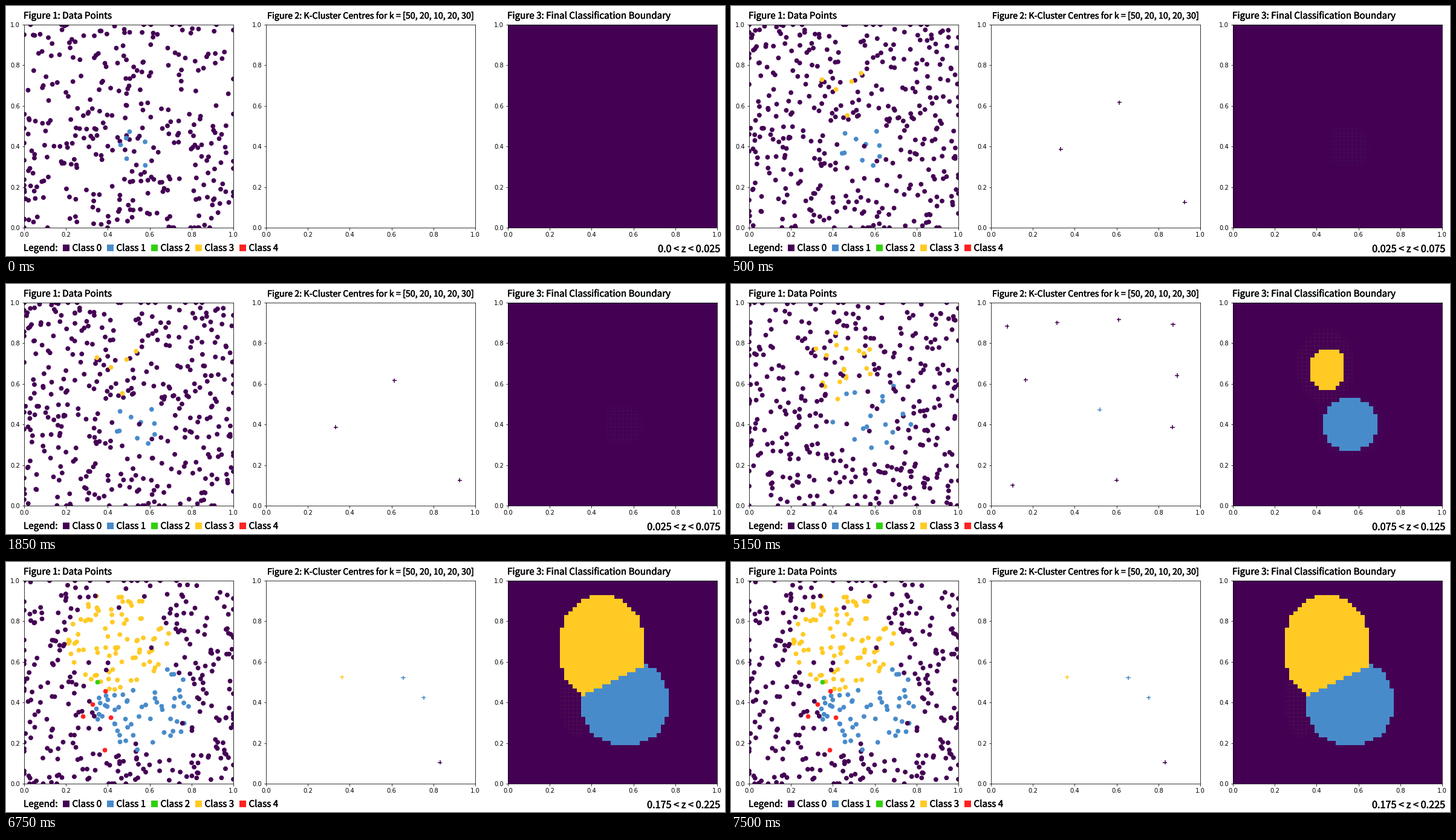
Recreate the animation shown at these times as a matplotlib script. Size 1189x415 px, loop 8000 ms.

```python
import numpy as np
import matplotlib.pyplot as plt
from matplotlib import patheffects
from matplotlib.animation import FuncAnimation
from matplotlib.collections import LineCollection
from matplotlib.colors import to_rgb, to_rgba
from matplotlib.patches import Rectangle

W, H = 1189, 415
LEFTS = (30, 430, 830)
BOTTOM, AX_W, AX_H = 368, 346, 337
STEP, LOOP = 250, 8000
CELLS = 51  # grid nodes per side, one square around each
ROUNDNESS = 2.2  # superellipse power of the class regions

PURPLE, BLUE, GREEN, YELLOW, RED = COLORS = (
    "#440154", "#488bcb", "#31d00e", "#ffca24", "#ff2222")

# Ellipses are (x, y, rx, ry) in axes units. A blob recolours the given
# share of the random points inside it; marks are single points.
SCENES = [
    dict(start=0, z="0.0 < z < 0.025", count=335, margin=0.02,
         marks={BLUE: [(0.504, 0.473), (0.488, 0.441), (0.461, 0.408),
                       (0.578, 0.423), (0.490, 0.340), (0.579, 0.307)]}),
    dict(start=500, z="0.025 < z < 0.075", count=400, margin=0.035,
         blobs=[(BLUE, (0.54, 0.40, 0.14, 0.13), 0.65)],
         marks={YELLOW: [(0.348, 0.729), (0.535, 0.761), (0.490, 0.720),
                         (0.415, 0.681), (0.469, 0.553)]},
         centres={PURPLE: [(0.333, 0.387), (0.614, 0.616), (0.926, 0.126)]},
         traces={BLUE: (0.55, 0.40, 0.09, 0.10)}),
    dict(start=2750, z="0.075 < z < 0.125", count=390, margin=0.035,
         blobs=[(BLUE, (0.58, 0.41, 0.22, 0.21), 0.5),
                (YELLOW, (0.44, 0.69, 0.16, 0.17), 0.6)],
         centres={PURPLE: [(0.077, 0.883), (0.316, 0.901), (0.611, 0.916),
                           (0.870, 0.892), (0.166, 0.619), (0.889, 0.641),
                           (0.867, 0.387), (0.103, 0.100), (0.601, 0.126)],
                  BLUE: [(0.519, 0.473)]},
         regions={BLUE: (0.56, 0.40, 0.13, 0.13),
                  YELLOW: (0.454, 0.674, 0.084, 0.104)},
         traces={YELLOW: (0.44, 0.69, 0.135, 0.18),
                 BLUE: (0.56, 0.395, 0.155, 0.155)}),
    dict(start=6750, z="0.175 < z < 0.225", count=430, margin=0.035,
         blobs=[(BLUE, (0.57, 0.385, 0.24, 0.22), 0.92),
                (YELLOW, (0.45, 0.70, 0.245, 0.25), 0.92)],
         marks={GREEN: [(0.351, 0.500)],
                RED: [(0.389, 0.455), (0.328, 0.390), (0.282, 0.331),
                      (0.415, 0.325), (0.386, 0.165)]},
         centres={YELLOW: [(0.363, 0.524)],
                  BLUE: [(0.656, 0.521), (0.753, 0.423)],
                  PURPLE: [(0.832, 0.104)]},
         regions={BLUE: (0.56, 0.40, 0.21, 0.21),
                  YELLOW: (0.45, 0.67, 0.20, 0.26)},
         traces={YELLOW: (0.33, 0.42, 0.08, 0.19)}),
]

axis = np.linspace(0, 1, CELLS)
NODES = np.stack(np.meshgrid(axis, axis), axis=-1)
ABOVE = NODES[..., 1] > 0.258 + 0.5 * NODES[..., 0]  # yellow's side of the border


def inside(points, ellipse, power=2):
    d = np.abs((points - ellipse[:2]) / ellipse[2:])
    return (d ** power).sum(axis=-1) < 1


def flatten(groups):
    """Colour groups to one array of positions and one list of colours."""
    pos = [p for group in groups.values() for p in group]
    colors = [c for c, group in groups.items() for _ in group]
    return np.reshape(pos, (-1, 2)), colors


def scatter_points(scene, seed):
    rng = np.random.default_rng(seed)
    m = scene["margin"]
    pos = rng.uniform(-m, 1 + m, (scene["count"], 2)).clip(0, 1)
    colors = np.full(len(pos), PURPLE)
    for color, ellipse, share in scene.get("blobs", []):
        colors[inside(pos, ellipse) & (rng.random(len(pos)) < share)] = color
    marks, mark_colors = flatten(scene.get("marks", {}))
    return np.vstack([pos, marks]), list(colors) + mark_colors


def paint(scene):
    """Class map and the mask of its coloured cells."""
    image = np.full((CELLS, CELLS, 3), to_rgb(PURPLE))
    taken = np.zeros((CELLS, CELLS), bool)
    for color, ellipse in scene.get("regions", {}).items():
        mask = inside(NODES, ellipse, ROUNDNESS)
        if color == YELLOW:
            mask &= ABOVE
        image[mask] = to_rgb(color)
        taken |= mask
    return image, taken


def trace_lines(scene, taken):
    """Faint outlines of the still purple cells within each ellipse."""
    square = np.array([(-1, -1), (1, -1), (1, 1), (-1, 1), (-1, -1)]) * 0.01
    lines, colors = [], []
    for color, ellipse in scene.get("traces", {}).items():
        nodes = NODES[inside(NODES, ellipse) & ~taken]
        lines += [square + node for node in nodes]
        colors += [to_rgba(color, 0.05)] * len(nodes)
    return lines, colors


def prepare(scene, seed):
    image, taken = paint(scene)
    return dict(z=scene["z"], image=image,
                dots=scatter_points(scene, seed),
                plus=flatten(scene.get("centres", {})),
                lines=trace_lines(scene, taken))


READY = [prepare(scene, seed) for seed, scene in enumerate(SCENES, 5)]
STARTS = [scene["start"] for scene in SCENES]

plt.rcParams.update({"font.family": "DejaVu Sans", "font.size": 10})
fig = plt.figure(figsize=(W / 72, H / 72), dpi=72, facecolor="white")


def label(x, y, text, size=15.2, ha="left"):
    """Slightly thickened text with its baseline at stage pixel y."""
    return fig.text(x / W, 1 - y / H, text, fontsize=size, ha=ha, va="baseline",
                    family="Noto Sans CJK JP", color="black",
                    path_effects=[patheffects.withStroke(linewidth=0.5,
                                                         foreground="black")])


def panel(left):
    ax = fig.add_axes([left / W, 1 - BOTTOM / H, AX_W / W, AX_H / H])
    ax.set(xlim=(0, 1), ylim=(0, 1))
    return ax


ax1, ax2, ax3 = (panel(left) for left in LEFTS)
dots = ax1.scatter([], [], s=46)
plus = ax2.scatter([], [], s=50, marker="+", linewidths=1.5)
image = ax3.imshow(READY[0]["image"], origin="lower", interpolation="nearest",
                   extent=(-0.01, 1.01, -0.01, 1.01), aspect="auto")
ax3.set(xlim=(0, 1), ylim=(0, 1))
grid = ax3.add_collection(LineCollection([], linewidths=0.6))

label(29, 21, "Figure 1: Data Points")
label(432, 21, "Figure 2: K-Cluster Centres for k = [50, 20, 10, 20, 30]", 14.3)
label(829, 21, "Figure 3: Final Classification Boundary")
label(29, 406.5, "Legend:")
for k, color in enumerate(COLORS):
    x = 94 + 73 * k
    fig.add_artist(Rectangle((x / W, 1 - 407 / H), 11 / W, 11 / H,
                             facecolor=color, linewidth=0))
    label(x + 15.5, 406.5, f"Class {k}")
z_text = label(1180.5, 408.5, "", 16.2, "right")


def update(i):
    scene = READY[np.searchsorted(STARTS, i * STEP, side="right") - 1]
    for artist, key in ((dots, "dots"), (plus, "plus")):
        pos, colors = scene[key]
        artist.set_offsets(pos)
        artist.set_color(colors)
    image.set_data(scene["image"])
    lines, colors = scene["lines"]
    grid.set_segments(lines)
    grid.set_color(colors)
    z_text.set_text(scene["z"])
    return dots, plus, image, grid, z_text


anim = FuncAnimation(fig, update, frames=LOOP // STEP, interval=STEP,
                     repeat=True, repeat_delay=0, blit=False)
plt.show()
```
